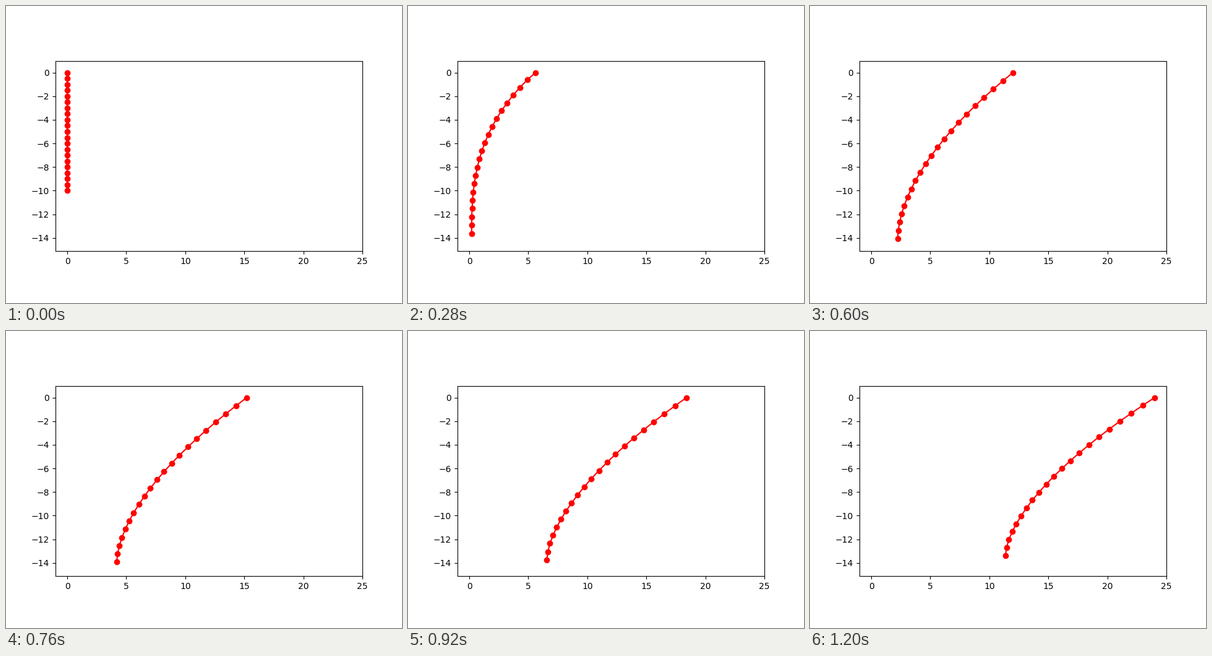
Write a matplotlib script that moves like this. It is 640 px wide and 480 px high and loops after 1240 ms.

```python
import numpy as np
import matplotlib.pyplot as plt
from matplotlib.animation import FuncAnimation

FRAMES = 31
LENGTH = 10          # rope length at rest
SPEED = 0.8          # head travel per frame
MAX_LAG = 13.7       # how far the tail can trail behind the head

s = np.linspace(0, 1, 21)    # 0 at the head, 1 at the tail


def soft_cap(value, cap, sharpness=2.6):
    """Follow value while it is small, then level off at cap."""
    return value / (1 + (value / cap) ** sharpness) ** (1 / sharpness)


def rope(frame):
    t = max(frame, 1e-9)
    head = SPEED * t

    # The bend starts at the head and spreads into a steady curve.
    bend = 1.62 / np.tanh(t / 9.8)
    x = head - soft_cap(head, MAX_LAG) * (1 - (1 - s) ** bend)

    # The tail sinks quickly, then the tow slowly lifts it again.
    sink = (4.97 - 0.0533 * t) * np.tanh(t / 6.5)
    sag = 1 / np.tanh(t / 5.25)
    y = -LENGTH * s - sink * s ** sag
    return x, y


fig, ax = plt.subplots(figsize=(6.4, 4.8), dpi=100)
ax.set_aspect("equal")
ax.set_xlim(-1, 25)
ax.set_ylim(-15.13, 1)
line, = ax.plot([], [], "ro-")


def draw(frame):
    line.set_data(*rope(frame))
    return line,


anim = FuncAnimation(fig, draw, frames=FRAMES, interval=40,
                     repeat=True, repeat_delay=0)
plt.show()
```
